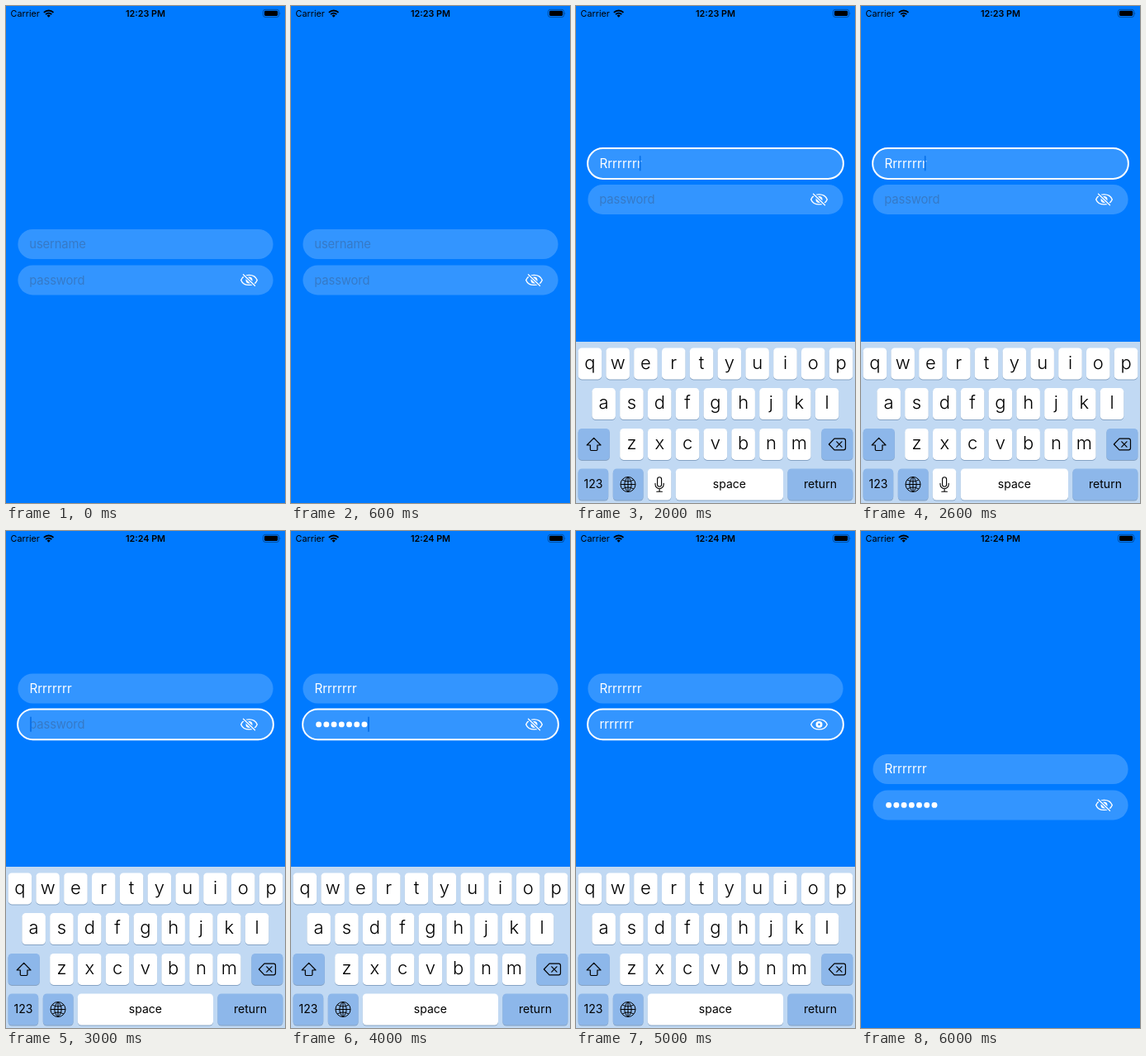
An HTML page for the animation above (7000 ms loop, 338 by 601 pixels).

```html
<!DOCTYPE html>
<html>
<head>
<meta charset="utf-8">
<style>
html, body { margin: 0; width: 100%; height: 100%; overflow: hidden; background: #007aff; }
svg { display: block; width: 338px; height: 601px; font-family: Inter, "Liberation Sans", sans-serif; }
</style>
</head>
<body>
<svg id="screen" viewBox="0 0 338 601"></svg>
<script>
const STEP = 1000;
const NAME = 'Rrrrrrrr', SECRET = 'rrrrrrr';
const states = [
  { time: '12:23' },
  { time: '12:23', focus: 'name', caps: true, mic: true },
  { time: '12:23', focus: 'name', name: NAME, caret: 77.7, mic: true },
  { time: '12:24', focus: 'secret', name: NAME, caret: 30 },
  { time: '12:24', focus: 'secret', name: NAME, secret: SECRET, caret: 94 },
  { time: '12:24', focus: 'secret', name: NAME, secret: SECRET, shown: true },
  { time: '12:24', name: NAME, secret: SECRET }
];

const rect = (x, y, w, h, r, fill, extra = '') =>
  `<rect x="${x}" y="${y}" width="${w}" height="${h}" rx="${r}" fill="${fill}" ${extra}/>`;
const text = (x, y, size, str, extra = '') =>
  `<text x="${x}" y="${y}" font-size="${size}" ${extra}>${str}</text>`;
const line = (d, width, color = '#000', extra = '') =>
  `<path d="${d}" fill="none" stroke="${color}" stroke-width="${width}" ${extra}/>`;
const circle = (x, y, r, fill) => `<circle cx="${x}" cy="${y}" r="${r}" fill="${fill}"/>`;
const middle = 'text-anchor="middle"';

function statusBar(time) {
  const arc = r => {
    const k = r * Math.SQRT1_2;
    return `M${51.7 - k} ${13.7 - k}A${r} ${r} 0 0 1 ${51.7 + k} ${13.7 - k}`;
  };
  return text(5.6, 13, 10.8, 'Carrier') +
    line(arc(8.2) + arc(5.1), 1.9) +
    `<path d="${arc(2.9)}L51.7 13.7Z"/>` +
    text(169, 13, 10.8, time + ' PM', middle + ' font-weight="600"') +
    rect(311.5, 4.3, 19.2, 9.2, 2.6, 'none', 'stroke="#000" stroke-opacity=".4" stroke-width=".9"') +
    rect(313, 5.8, 16.2, 6.2, 1.4, '#000') +
    '<path d="M331.7 7.4q1.4 1.5 0 3z" fill-opacity=".5"/>';
}

function eye(y, open) {
  const slash = 'M-7 -6.6L7 6.9';
  return `<g transform="translate(294.5 ${y})">` +
    line('M-9.8 0C-6.5 -8 6.5 -8 9.8 0C6.5 8 -6.5 8 -9.8 0Z', 1.4, '#fff', 'stroke-linejoin="round"') +
    circle(0, 0, 4, '#fff') + circle(0, 0, 1.3, '#3395ff') +
    (open ? '' : line(slash, 3.6, '#3395ff') + line(slash, 1.3, '#fff', 'stroke-linecap="round"')) +
    '</g>';
}

function field(y, hint, value, focused, caret, masked) {
  let out = rect(14.4, y - 18, 309.2, 36, 18, '#3395ff');
  if (focused) out += rect(14.1, y - 18.4, 309.8, 36.8, 18.4, 'none', 'stroke="#fff" stroke-width="2"');
  if (!value) out += text(28.3, y + 5.3, 14.8, hint, 'fill="#367ac7" letter-spacing="-.15"');
  else if (masked) out += [...value].map((_, i) => circle(33.6 + i * 9.23, y, 3.45, '#fff')).join('');
  else out += text(28.4, y + 5.4, 15.2, value, 'fill="#fff"');
  if (focused && caret) out += rect(caret - .9, y - 9.5, 1.8, 18.5, .9, '#0a72ea');
  return out;
}

function key(x, y, w, blue) {
  return rect(x, y + 1, w, 38, 4.5, '#86a3c4') + rect(x, y, w, 38, 4.5, blue ? '#8db7ea' : '#fff');
}

function keyboard({ caps, mic }) {
  let out = rect(0, 406, 338, 195, 0, '#c1d9f3');
  [['qwertyuiop', 2.6, 413.4], ['asdfghjkl', 19.4, 462.1], ['zxcvbnm', 53.2, 510.9]].forEach(([row, x0, y]) =>
    [...row].forEach((c, i) => {
      const x = x0 + i * 33.8;
      out += key(x, y, 28.5) + (caps
        ? text(x + 14.25, y + 26.6, 20, c.toUpperCase(), middle)
        : text(x + 14.25, y + 25.2, 22, c, middle + ' font-weight="300"'));
    }));

  out += key(2.6, 510.9, 38.2, !caps) + key(297.4, 510.9, 38, true) +
    line('M21.6 522.3L30 531H25.9V536.3Q25.9 537.5 24.7 537.5H18.5Q17.3 537.5 17.3 536.3V531H13.2Z', 1.2, '#000',
      `stroke-linejoin="round" style="fill:${caps ? '#000' : 'none'}"`) +
    line('M313 523.2H324.2Q326.5 523.2 326.5 525.5V534.5Q326.5 536.8 324.2 536.8H313L306.4 530ZM315.8 526.8l6.2 6.4m0-6.4l-6.2 6.4',
      1.2, '#000', 'stroke-linejoin="round" stroke-linecap="round"');

  const y = 559.5, base = 583.4, spaceX = mic ? 120.8 : 86.8;
  out += key(2.6, y, 36.6, true) + text(20.9, base, 14, '123', middle) +
    key(44.8, y, 36.8, true) +
    line('M54 578.5a9 9 0 1 0 18 0a9 9 0 1 0 -18 0H72M63 569.5V587.5M63 569.5C57.5 574 57.5 583 63 587.5C68.5 583 68.5 574 63 569.5M56.2 573Q63 577 69.8 573M56.2 584Q63 580 69.8 584', 1) +
    key(spaceX, y, 251 - spaceX, false) + text((spaceX + 251) / 2, base, 14, 'space', middle) +
    key(256.4, y, 79, true) + text(296, base, 14, 'return', middle);
  if (mic) out += key(86.8, y, 28.5) +
    rect(98.6, 569.8, 5, 11.4, 2.5, 'none', 'stroke="#000" stroke-width="1.1"') +
    line('M96 577.2v1.4a5.1 5.1 0 0 0 10.2 0v-1.4M101.1 583.8V587.3M97.8 587.3h6.6', 1.1, '#000', 'stroke-linecap="round"');
  return out;
}

function draw(s) {
  const y = s.focus ? 190.5 : 288, below = y + 43.4;
  return rect(0, 0, 338, 601, 0, '#007aff') + statusBar(s.time) +
    field(y, 'username', s.name, s.focus === 'name', s.caret) +
    field(below, 'password', s.secret, s.focus === 'secret', s.caret, !s.shown) +
    eye(below, s.shown) + (s.focus ? keyboard(s) : '');
}

const screenEl = document.getElementById('screen');
const start = performance.now();
let current = -1;
function tick() {
  const index = Math.floor((performance.now() - start) / STEP) % states.length;
  if (index !== current) screenEl.innerHTML = draw(states[current = index]);
  requestAnimationFrame(tick);
}
tick();
</script>
</body>
</html>
```
